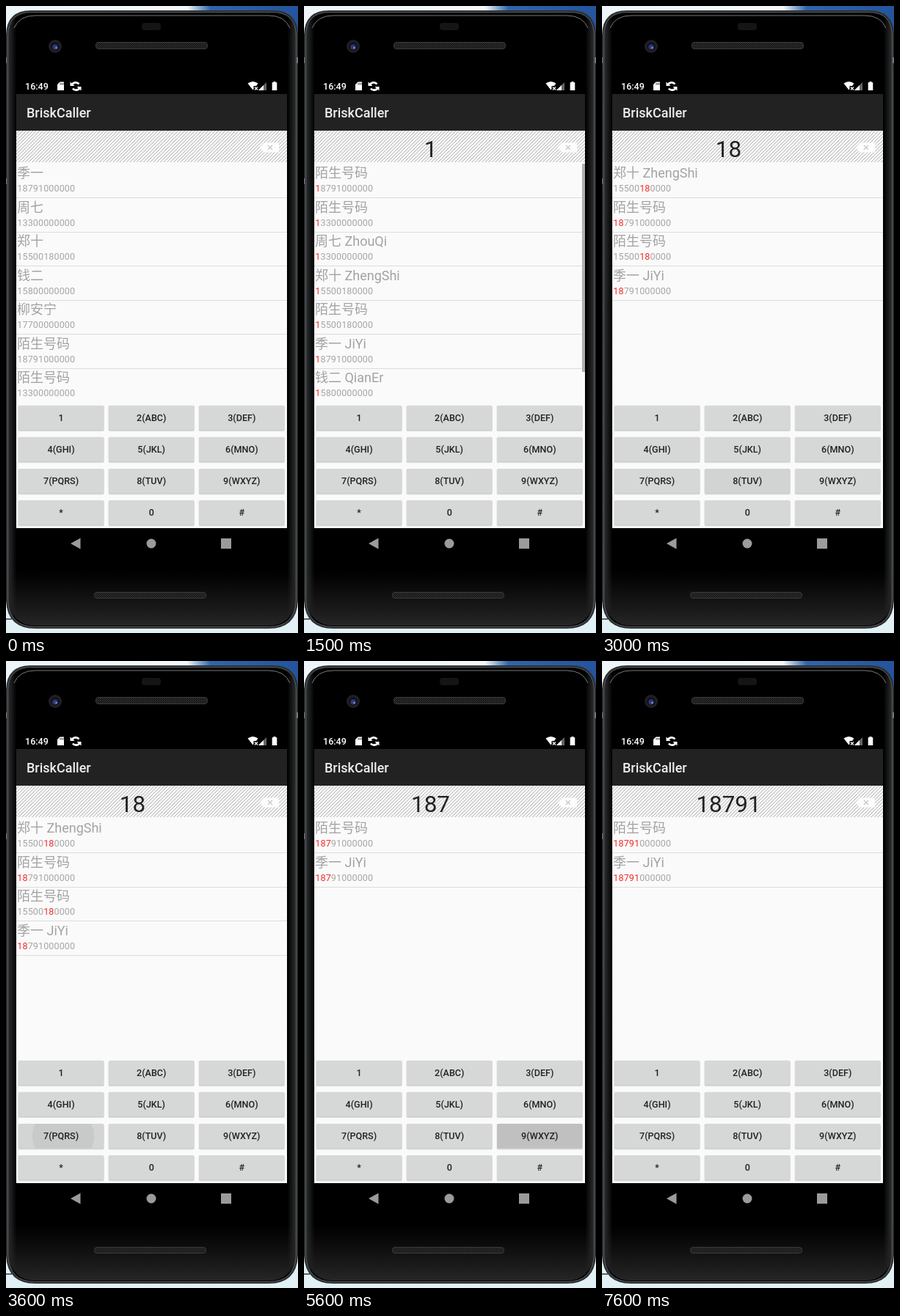
These frames come from a looping animation (398x855 px, 8000 ms). An HTML page:

```html
<!DOCTYPE html>
<html lang="zh-CN">
<head>
<meta charset="utf-8">
<title>Dialer</title>
<style>
html, body { margin: 0; height: 100%; overflow: hidden; background: #e2f1f6; }
svg { display: block; width: 100vw; height: 100vh; font-family: Roboto, "Noto Sans CJK SC", "Noto Sans CJK", sans-serif; }
.name { font-size: 18px; fill: #a3a3a3; }
.number { font-size: 12.57px; letter-spacing: .11px; fill: #a6a6a6; white-space: pre; }
.hit { fill: #f52a2a; }
.key { font-size: 12.57px; font-weight: 500; fill: #222; text-anchor: middle; }
</style>
</head>
<body>
<svg viewBox="0 0 398 855" preserveAspectRatio="none">
  <defs>
    <pattern id="hatch" width="4.6" height="4.6" patternUnits="userSpaceOnUse">
      <rect width="4.6" height="4.6" fill="#fdfdfd"/>
      <path d="M-1 1l2-2M-1 5.600l6.600-6.600M3.600 5.600l2-2" stroke="#8f8f8f" stroke-width=".85"/>
    </pattern>
    <pattern id="mesh" width="3" height="3" patternUnits="userSpaceOnUse">
      <rect width="3" height="3" fill="#171717"/>
      <path d="M0 3l3-3M0 0l3 3" stroke="#303030" stroke-width=".7"/>
    </pattern>
    <linearGradient id="sky">
      <stop offset="0" stop-color="#edf5f9"/><stop offset=".62" stop-color="#f4f8fa"/>
      <stop offset=".7" stop-color="#2f66ab"/><stop offset="1" stop-color="#24549c"/>
    </linearGradient>
    <linearGradient id="sides">
      <stop offset="0" stop-color="#2e2f31"/><stop offset=".03" stop-color="#000"/>
      <stop offset=".97" stop-color="#000"/><stop offset="1" stop-color="#2e2f31"/>
    </linearGradient>
    <linearGradient id="foot" x2="0" y2="1">
      <stop offset="0" stop-color="#222" stop-opacity="0"/><stop offset="1" stop-color="#262626"/>
    </linearGradient>
    <clipPath id="keyClip"><rect id="clipBox" width="116.5" height="33.5" rx="1.5"/></clipPath>
  </defs>

  <rect width="398" height="60" fill="url(#sky)"/>
  <path d="M0 836h8" stroke="#333" stroke-width="1.5"/>
  <path d="M0 39Q1 6 34 6H364Q397 6 398 39V811Q396 849 358 849H40Q2 849 0 811Z" fill="#2c2e30"/>
  <path d="M2.500 40Q3 8.500 35 8.500H363Q395 8.500 395.500 40V810Q394 846.500 358 846.500H40Q4 846.500 2.500 810Z" fill="url(#sides)" stroke="#5a5d60"/>
  <path d="M5 770H393V810Q391 845 357 845H41Q7 845 5 810Z" fill="url(#foot)"/>
  <path d="M11 30Q18 13 40 13H358Q380 13 387 30" fill="none" stroke="#77797c"/>
  <path d="M0 70v8M0 235v8M397.500 70v8" stroke="#85888c" stroke-width="2"/>
  <rect x="185" y="23" width="26" height="10" rx="4" fill="#151515"/>
  <circle cx="67" cy="55" r="9" fill="#202024"/>
  <circle cx="67" cy="55" r="6" fill="#12131f"/>
  <circle cx="67" cy="56" r="3.500" fill="#303a78"/>
  <circle cx="68.500" cy="57" r="1.200" fill="#8d9ae0"/>
  <g fill="url(#mesh)" stroke="#3a3a3a">
    <rect x="122.500" y="49.500" width="152" height="9" rx="3.500"/>
    <rect x="120.500" y="799.500" width="152" height="8" rx="3.500"/>
  </g>

  <g fill="#fff">
    <text x="26" y="114" font-size="12.57" font-weight="500">16:49</text>
    <path d="M73.500 103.500H79V115H70V107z"/>
    <path d="M74 105v2.500M76 105v2.500M78 105v2.500" stroke="#000" stroke-width=".8"/>
    <path d="M90 107.500a5.200 4.300 0 0 1 9.500-1M100.500 111.500a5.200 4.300 0 0 1-9.500 1" fill="none" stroke="#fff" stroke-width="2.600"/>
    <path d="M87.500 103.500v5.500h6zM102.500 115.500v-5.500h-6z"/>
    <path d="M329.500 105.500Q336.500 100.500 343.500 105.500L341 109H337.500V113L336.500 114.500z"/>
    <path d="M339 110.500l4 4m0-4l-4 4" stroke="#fff" stroke-width="1.200"/>
    <path d="M355 104v11h-11z" opacity=".4"/><path d="M351 108v7h-7z"/>
    <path d="M364.500 103h3v1.300h1.800V115h-6.600V104.300h1.800z"/>
  </g>

  <rect x="14" y="120" width="369" height="50" fill="#222"/>
  <text x="28" y="152" font-size="18" font-weight="500" fill="#eee">BriskCaller</text>
  <rect x="14" y="170" width="369" height="542" fill="#fafafa"/>
  <rect x="14" y="170" width="369" height="43" fill="url(#hatch)"/>
  <text id="display" x="172.500" y="206" font-size="31.4" text-anchor="middle" fill="#222"></text>
  <path d="M345.500 193l6-6.500H372v13H351.500z" fill="#fff" opacity=".9"/>
  <path d="M357 190l6 6m0-6l-6 6" stroke="#c6c6c6" stroke-width="1.300"/>

  <g id="list"></g>
  <rect id="scrollbar" x="379" y="215" width="4" height="284" fill="#b0b0b0"/>
  <g id="keys"></g>
  <g id="press" clip-path="url(#keyClip)">
    <rect id="tint" width="116.500" height="33.500"/>
    <circle id="ripple"/>
  </g>
  <g id="labels"></g>

  <g fill="#9b9b9b">
    <path d="M88 733l13.500-7.500v15z"/>
    <circle cx="198" cy="733" r="6.500"/>
    <rect x="293" y="726" width="14" height="14"/>
  </g>
</svg>
<script>
const LOOP = 8000, STEP = 100, ROW = 46.5;
const $ = id => document.getElementById(id);
const setAttrs = (el, attrs) => { for (const k in attrs) el.setAttribute(k, attrs[k]); };

const labels = ['1', '2(ABC)', '3(DEF)', '4(GHI)', '5(JKL)', '6(MNO)', '7(PQRS)', '8(TUV)', '9(WXYZ)', '*', '0', '#'];
const keyPos = i => ({ x: 16.8 + i % 3 * 123.1, y: 544.7 + Math.floor(i / 3) * 43.1 });

const ji = ['季一', 'JiYi', '18791000000'];
const zhou = ['周七', 'ZhouQi', '13300000000'];
const zheng = ['郑十', 'ZhengShi', '15500180000'];
const qian = ['钱二', 'QianEr', '15800000000'];
const liu = ['柳安宁', '', '17700000000'];
const stranger = ([, , number]) => ['陌生号码', '', number];

const recent = [ji, zhou, zheng, qian, liu, stranger(ji), stranger(zhou)].map(([name, , number]) => [name, '', number]);
const matches = [
  recent,
  [stranger(ji), stranger(zhou), zhou, zheng, stranger(zheng), ji, qian],
  [zheng, stranger(ji), stranger(zheng), ji],
  [stranger(ji), ji]
];

// Each step is [ripple radius, ripple opacity, tint opacity]; the digit appears on the last step.
const spread = [[42, .05, .01], [90, .07, .02], [0, 0, .05]];
const presses = [
  { at: 1300, key: 0, cx: 79, steps: [[52, .08, .015], [0, 0, .04]] },
  { at: 2700, key: 7, cx: 204, steps: spread, rest: .02, until: 3600 },
  { at: 3600, key: 6, cx: 78, steps: spread },
  { at: 5600, key: 8, cx: 321, steps: [[90, .07, .035], [0, 0, .05]] },
  { at: 7300, key: 0, cx: 79, steps: spread }
];
const typedAt = p => p.at + (p.steps.length - 1) * STEP;

labels.forEach((label, i) => {
  const { x, y } = keyPos(i);
  $('keys').innerHTML += `<rect x="${x - .5}" y="${y + .5}" width="117.5" height="35" rx="2" fill="#e6e6e6"/>
    <rect x="${x}" y="${y + 1}" width="116.5" height="33.5" rx="1.5" fill="#c8c8c8"/>
    <rect x="${x}" y="${y}" width="116.5" height="33.5" rx="1.5" fill="#d6d7d7"/>`;
  $('labels').innerHTML += `<text class="key" x="${x + 58.3}" y="${y + 21.3}">${label}</text>`;
});

function rowMarkup([name, latin, number], i, typed) {
  const y = i * ROW, start = number.indexOf(typed), end = start + typed.length;
  const divider = i < 6 ? `<path d="M14 ${Math.floor(261.5 + y) + .5}H383" stroke="#dcdcdc"/>` : '';
  return `<text class="name" x="15" y="${234 + y}">${name} ${latin}</text>
    <text class="number" x="15.3" y="${253 + y}">${number.slice(0, start)}<tspan class="hit">${
      number.slice(start, end)}</tspan>${number.slice(end)}</text>${divider}`;
}

let shown = null;
function showTyped(typed) {
  if (typed === shown) return;
  shown = typed;
  $('display').textContent = typed;
  $('list').innerHTML = matches[Math.min(typed.length, 3)].map((row, i) => rowMarkup(row, i, typed)).join('');
  $('scrollbar').style.display = typed.length === 1 ? '' : 'none';
}

function showPress(t) {
  const press = presses.find(p => t >= p.at && t < (p.until || p.at + p.steps.length * STEP));
  $('press').style.display = press ? '' : 'none';
  if (!press) return;
  const [r, opacity, tint] = press.steps[Math.floor((t - press.at) / STEP)] || [0, 0, press.rest];
  const pos = keyPos(press.key);
  setAttrs($('clipBox'), pos);
  setAttrs($('tint'), { ...pos, 'fill-opacity': tint });
  setAttrs($('ripple'), { cx: press.cx, cy: pos.y + 17, r, 'fill-opacity': opacity });
}

function draw(now) {
  const t = now % LOOP;
  showTyped(presses.filter(p => t >= typedAt(p)).map(p => labels[p.key][0]).join(''));
  showPress(t);
}

let start;
function tick(now) {
  start ??= now;
  draw(now - start);
  requestAnimationFrame(tick);
}
draw(0);
requestAnimationFrame(tick);
</script>
</body>
</html>
```
